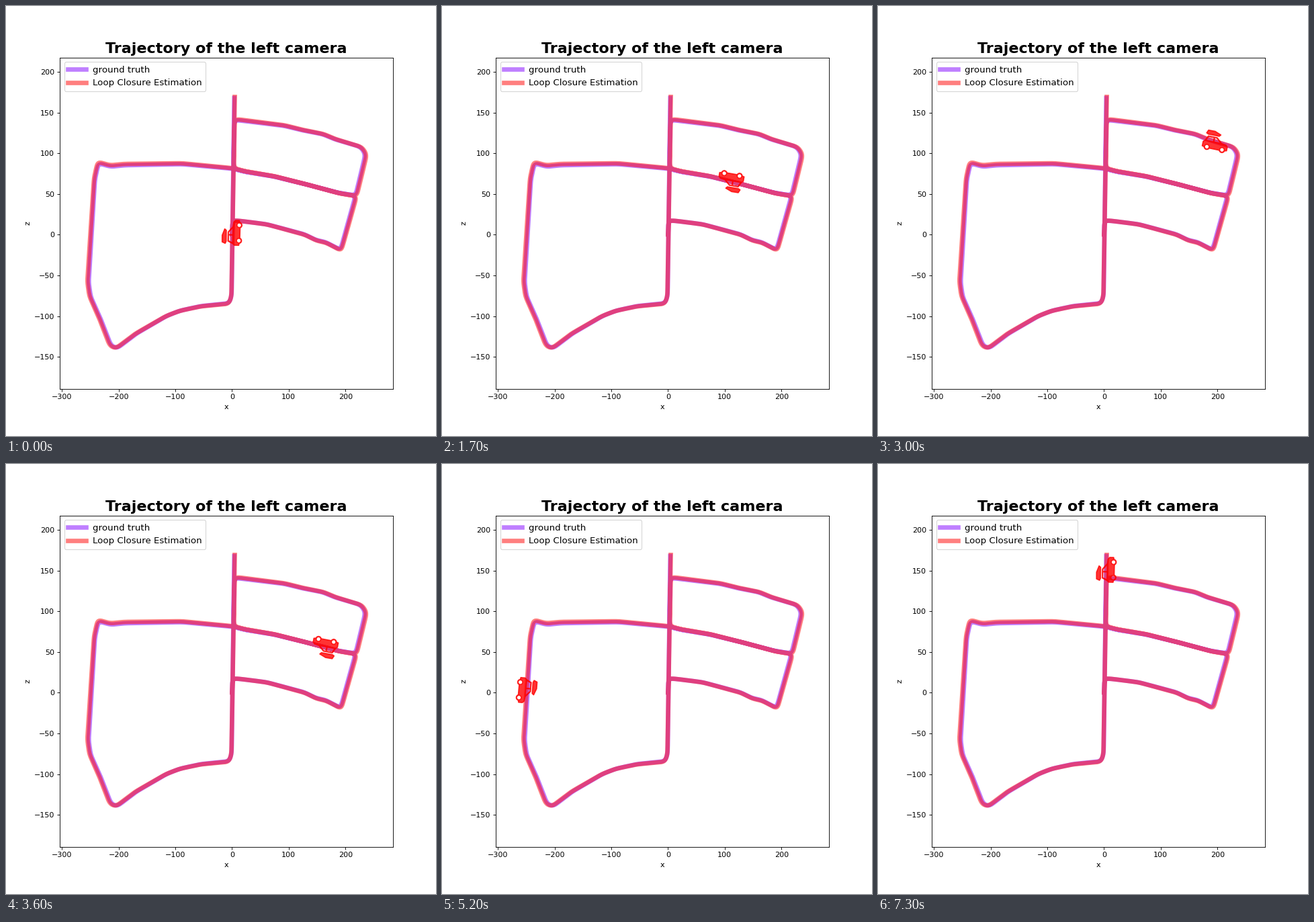
A matplotlib script for the animation above (7.4 s loop, 640x640 px).

```python
import numpy as np
import matplotlib.pyplot as plt
from matplotlib.animation import FuncAnimation
from matplotlib.patches import PathPatch
from matplotlib.path import Path
from matplotlib.transforms import Affine2D

SIZE, DPI = 640, 80
FRAMES, INTERVAL = 74, 100
VIOLET, RED = (0.5, 0, 1), (1, 0, 0)

# Street corners in stage pixels, y down; the route rounds them off
LOWER = [(336.6, 340), (337, 318.7), (352, 320.3), (388, 325), (445, 340.5),
         (463, 349.7), (476, 352), (499, 364.5), (522, 283)]
MIDDLE = [(497, 279), (457, 268), (400, 253.5), (357, 246.3), (339, 241.5)]
UPPER = [(340.3, 168), (415, 177.5), (440, 184), (473, 190.5), (490, 198),
         (530, 210), (537, 221), (522, 283)]
OUTER = [(262, 234), (175, 235), (155, 237.3), (136.5, 231.5), (131, 256),
         (121, 410), (124, 432), (138, 463), (154.5, 506), (163, 510),
         (192, 488), (238, 461.5), (258, 453.8), (290, 447), (332, 443.3),
         (335.5, 432), (340.5, 135.3)]

# (frame, x, y): places the car passes; even speed in between
STOPS = [(0, 336.6, 337.5), (8, 473, 351), (10, 503, 358), (16, 454, 267),
         (24, 374, 172), (32, 535.5, 230.5), (36, 474.5, 273),
         (40, 362, 247), (52, 126, 337), (56, 150, 496), (63, 292, 447),
         (73, 340.2, 157.5)]


def lengths(p):
    return np.r_[0, np.cumsum(np.hypot(*np.diff(p, axis=0).T))]


def along(points, at, s):
    return np.array([np.interp(s, at, col) for col in points.T]).T


def rounded(corners, sigma=4.5, step=0.5):
    """Evenly sampled polyline, softened by a Gaussian of sigma pixels."""
    p = np.array(corners, float)
    at = lengths(p)
    p = along(p, at, np.arange(0, at[-1], step))
    n = int(4 * sigma / step)
    kernel = np.exp(-0.5 * (np.arange(-n, n + 1) * step / sigma) ** 2)
    kernel /= kernel.sum()
    return np.array([np.convolve(np.pad(col, n, "reflect", reflect_type="odd"),
                                 kernel, "valid") for col in p.T]).T


def arc(x, y, r, start, end, n=25):
    a = np.radians(np.linspace(start, end, n))
    return list(zip(x + r * np.cos(a), y + r * np.sin(a)))


def ring(points):
    return Path(list(points) + [points[0]], closed=True)


def car_path(wheel_x=11.5, axle=-10.2):
    body = [(-18.5, axle), (-18.5, -3.5), (-16, -1), (-12.5, 6), (1, 6),
            (9, -1), (16, -2), (18.5, -4.5), (18.5, axle)]
    body += arc(wheel_x, axle, 4, -10, -160)
    body += arc(-wheel_x, axle, 4, -20, -170)
    rear = [(-15, -1), (-3.4, -1), (-3.4, 5.4), (-12, 5.4)]
    front = [(-2.8, -1), (8, -1), (0.8, 5.4), (-2.8, 5.4)]
    roof = [(-16, 10), (-14, 14.6), (-4, 14.8), (5.5, 11.2), (3.5, 8.8),
            (-13, 8.6)]
    wheels = [arc(x, axle, 3.4, 0, 360) for x in (-wheel_x, wheel_x)]
    return Path.make_compound_path(
        *[ring(s) for s in [body, rear, front, roof] + wheels])


fig, ax = plt.subplots(figsize=(SIZE / DPI, SIZE / DPI), dpi=DPI)
ax.set_xlim(-303.8, 283.87)
ax.set_ylim(-189.17, 217.6)
ax.set_title("Trajectory of the left camera", fontsize=20, fontweight="bold")
ax.set_xlabel("x")
ax.set_ylabel("z")

route = rounded(LOWER + MIDDLE + UPPER + MIDDLE + OUTER)
stage = np.c_[route[:, 0], SIZE - route[:, 1]]
track = ax.transData.inverted().transform(stage)
# The estimate drifts from the truth by a slight turn and stretch
truth = Affine2D().rotate(0.005).scale(0.992).transform(track)

for data, color, label in ((truth, VIOLET, "ground truth"),
                           (track, RED, "Loop Closure Estimation")):
    ax.plot(*data.T, color=color, lw=6, alpha=0.5, label=label)
ax.legend(loc="upper left", fontsize=12)

dist = lengths(track)


def stop_distances(reach=380):
    """Distance of each stop, searched only ahead of the one before."""
    found, at = [], 0
    for _, x, y in STOPS:
        gap = np.hypot(route[:, 0] - x, route[:, 1] - y)
        gap[(dist < at) | (dist > at + reach)] = np.inf
        at = dist[np.argmin(gap)]
        found.append(at)
    return found


travel = np.interp(range(FRAMES), [s[0] for s in STOPS], stop_distances())

car = PathPatch(car_path(), facecolor=RED, edgecolor=RED, lw=1.5, alpha=0.8,
                joinstyle="round", zorder=4)
ax.add_patch(car)


def update(i):
    s = travel[i]
    dx, dy = along(track, dist, s + 2) - along(track, dist, s - 2)
    place = Affine2D().rotate(np.arctan2(dy, dx))
    place.translate(*along(stage, dist, s)).scale(1 / DPI)
    car.set_transform(place + fig.dpi_scale_trans)
    return [car]


anim = FuncAnimation(fig, update, frames=FRAMES, interval=INTERVAL,
                     repeat=True, repeat_delay=0, blit=False)
plt.show()
```
